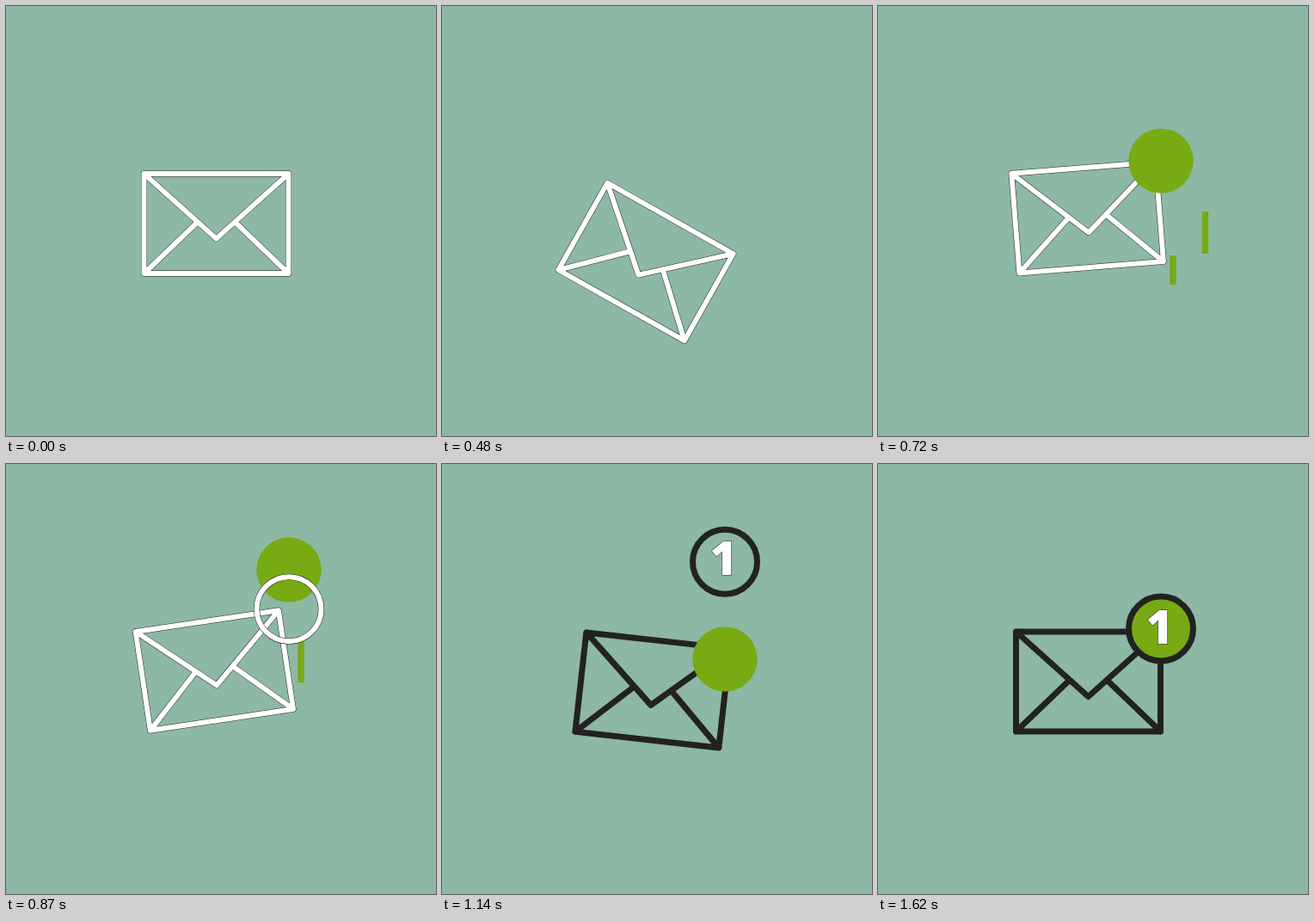
Recreate the animation shown at these times as an HTML page with a canvas. Size 500x500 px, loop 3.63 s.

```html
<!DOCTYPE html>
<html lang="en">
<head>
<meta charset="utf-8">
<title>New message</title>
<style>
html, body { margin: 0; height: 100%; overflow: hidden; background: #8cb8a5; }
canvas { display: block; width: 100vw; height: 100vh; }
</style>
</head>
<body>
<canvas id="stage" width="500" height="500"></canvas>
<script>
const ctx = document.getElementById('stage').getContext('2d');
const BG = '#8cb8a5', DARK = '#222220', GREEN = '#78aa14', WHITE = '#fff';
const LOOP = 3630, STEP = 30, LAST = 54;

// Keys are [step, value]; steps last 30 ms.
const TILT = [[0, 0], [17, 31.2], [26.1, -15.3], [36, 8], [46, 0]];
const HOP = [[23, 0], [32.87, -112.6], [37.7, 36.7], [46, 0]];
const RING_DELAY = 4, DIGIT_DELAY = 8;
const PIVOT = [156, 261], BADGE = [329, 191.5];

function at(keys, s) {
  if (s <= keys[0][0]) return keys[0][1];
  for (let i = 1; i < keys.length; i++) {
    const [a, u] = keys[i - 1], [b, v] = keys[i];
    if (s < b) return u + (v - u) * (s - a) / (b - a);
  }
  return keys[keys.length - 1][1];
}

// White lines keep a hairline dark rim.
function outline(path, white) {
  ctx.lineJoin = ctx.lineCap = 'round';
  ctx.lineWidth = 7;
  ctx.strokeStyle = DARK;
  ctx.stroke(path);
  if (!white) return;
  ctx.lineWidth = 6;
  ctx.strokeStyle = WHITE;
  ctx.stroke(path);
}

const envelope = new Path2D(
  'M160.5 195H328.5V311H160.5ZL244.5 270.5L328.5 195M160.5 311L222 252M328.5 311L267 252');

function drawEnvelope(s, white) {
  ctx.save();
  ctx.translate(...PIVOT);
  ctx.rotate(at(TILT, s) * Math.PI / 180);
  ctx.translate(-PIVOT[0], -PIVOT[1]);
  outline(envelope, white);
  ctx.restore();
}

function drawStreak(x, start, s) {
  const from = 324, to = 204, head = from - 17 * (s - start);
  const top = Math.max(to, head), bottom = Math.min(from, head + 49);
  if (bottom <= top) return;
  ctx.fillStyle = GREEN;
  ctx.fillRect(x - 3.75, top, 7.5, bottom - top);
}

function disc(y, r) {
  const p = new Path2D();
  p.arc(BADGE[0], y, r, 0, 2 * Math.PI);
  return p;
}

function drawDigit(y) {
  ctx.font = '800 54px "Open Sans", sans-serif';
  const m = ctx.measureText('1');
  const x = 325 - (m.actualBoundingBoxRight - m.actualBoundingBoxLeft) / 2;
  ctx.lineJoin = 'miter';
  ctx.lineWidth = 1;
  ctx.strokeStyle = DARK;
  ctx.strokeText('1', x, y);
  ctx.fillStyle = WHITE;
  ctx.fillText('1', x, y);
}

function draw(s) {
  const start = HOP[0][0];
  const white = s < start + DIGIT_DELAY;
  ctx.fillStyle = BG;
  ctx.fillRect(0, 0, 500, 500);
  drawEnvelope(s, white);
  drawStreak(380.5, 19, s);
  drawStreak(343, 22, s);
  if (s >= start) {
    ctx.fillStyle = GREEN;
    ctx.fill(disc(BADGE[1] + at(HOP, s), 37.7));
  }
  if (s >= start + RING_DELAY)
    outline(disc(BADGE[1] + at(HOP, s - RING_DELAY), 37.5), white);
  if (s >= start + DIGIT_DELAY)
    drawDigit(209 + at(HOP, s - DIGIT_DELAY));
}

const begin = performance.now();
function tick() {
  const t = (performance.now() - begin) % LOOP;
  draw(Math.min(LAST, Math.floor(t / STEP)));
  requestAnimationFrame(tick);
}
tick();
</script>
</body>
</html>
```
